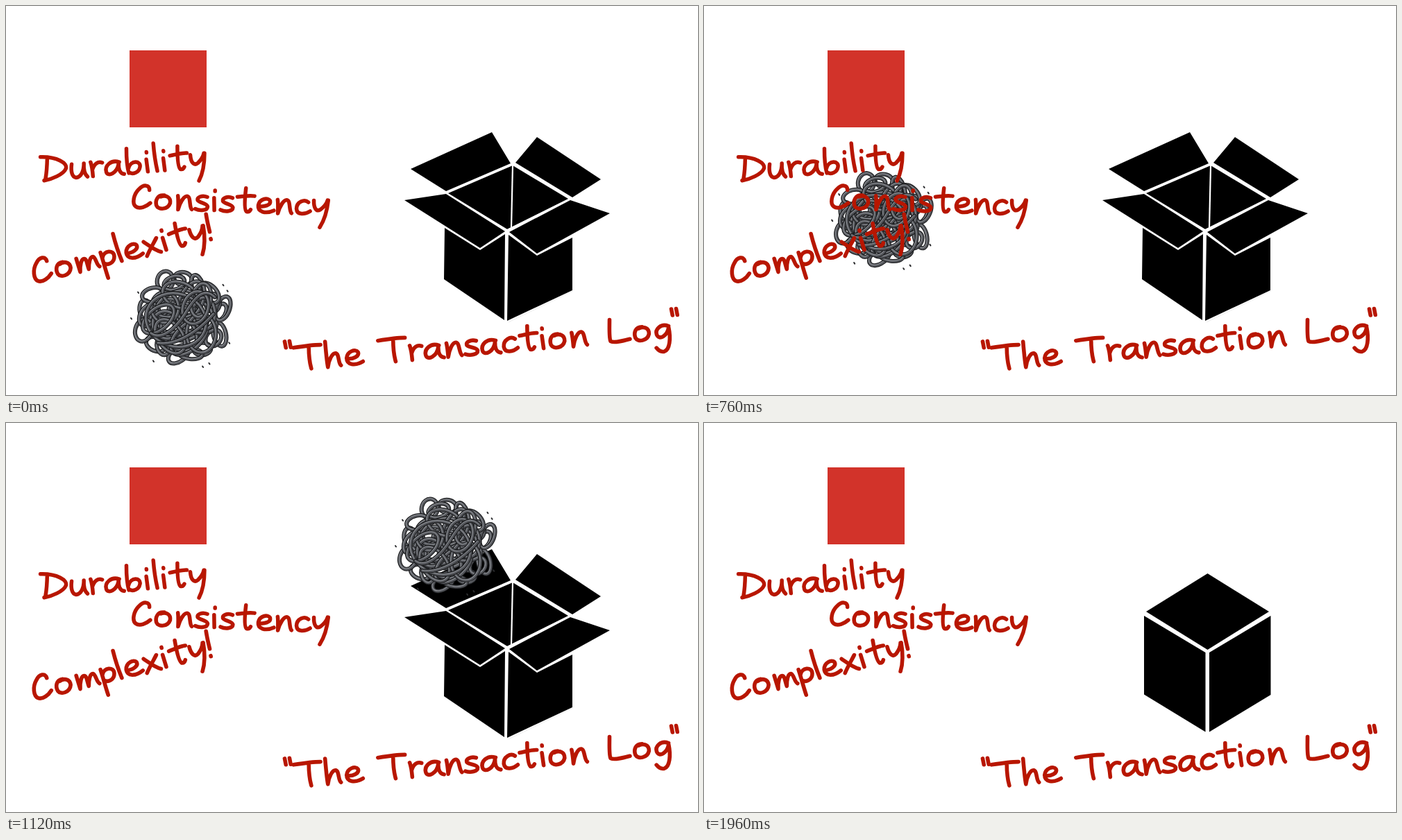
An HTML page that plays this animation: 997 px wide and 561 px high, repeating every 2480 ms.

```html
<!DOCTYPE html>
<html lang="en">
<head>
<meta charset="utf-8">
<title>The Transaction Log</title>
<style>
  html, body { margin: 0; width: 100%; height: 100%; overflow: hidden; background: #fff; }
  svg { display: block; width: 100vw; height: 100vh; }
  .line { fill: none; stroke-linecap: round; stroke-linejoin: round; }
  #writing { stroke: #b81600; stroke-width: 5.6; }
  #writing text { font: 44px "Open Sans", sans-serif; fill: transparent; stroke: none; }
</style>
</head>
<body>
<svg viewBox="0 0 997 561">
  <defs id="alphabet">
    <path data-ch="D" data-w="42" d="M10-33C9-22 8-12 5-1M0-34C24-33 40-22 36-14C32-6 14 0 3 1"/>
    <path data-ch="C" data-w="33" d="M25-27C25-35 16-35 10-28C2-20 0-6 6-2C12 2 22-3 27-8"/>
    <path data-ch="T" data-w="43" d="M1-32C14-33 28-34 40-33M23-32C22-20 22-10 24 0"/>
    <path data-ch="L" data-w="42" d="M10-34C9-22 7-8 9-3C14 0 26-2 37-4"/>
    <path data-ch="a" data-w="30" d="M22-18C10-23 0-14 2-5C4 3 18-2 21-16C20-8 22-1 28 0"/>
    <path data-ch="b" data-w="28" d="M4-37C3-24 3-10 5-1M5-8C9-20 24-18 22-9C20 0 10 2 5-2"/>
    <path data-ch="c" data-w="26" d="M20-18C14-23 3-18 3-8C4 2 16 0 23-5"/>
    <path data-ch="e" data-w="28" d="M3-10C12-8 22-12 20-18C17-23 5-21 3-11C2-1 14 2 26-4"/>
    <path data-ch="g" data-w="24" d="M21-18C10-23 1-15 3-7C6 2 18-4 21-16C23 0 20 16 12 18C6 19 3 15 1 12"/>
    <path data-ch="h" data-w="30" d="M4-37C4-22 4-10 5 0C7-10 13-20 18-19C23-17 20-5 24-1"/>
    <path data-ch="i" data-w="13" d="M4-19L5-1M5-30l0 1"/>
    <path data-ch="l" data-w="12" d="M3-42C3-28 4-14 6-1"/>
    <path data-ch="m" data-w="35" d="M3-20L4 0C6-10 10-18 14-17C18-16 16-6 17-1C19-10 23-18 27-17C31-15 29-4 33-1"/>
    <path data-ch="n" data-w="28" d="M3-20C4-14 4-8 4 0C6-10 12-21 17-20C22-19 20-4 24-1"/>
    <path data-ch="o" data-w="31" d="M14-20C4-21 1-12 3-5C6 2 20 1 23-9C24-18 16-21 9-18"/>
    <path data-ch="p" data-w="25" d="M4-20C5-6 5 6 6 18M5-12C9-22 24-20 22-10C20-1 10 1 5-4"/>
    <path data-ch="r" data-w="23" d="M3-21C5-14 5-8 5 0M5-10C8-18 14-22 20-19"/>
    <path data-ch="s" data-w="24" d="M18-20C10-23 3-19 4-15C6-11 18-11 19-6C19 0 8 1 1-2"/>
    <path data-ch="t" data-w="29" d="M13-35C12-22 11-4 15-1C18 0 20-2 21-4M1-22C10-23 18-25 26-24"/>
    <path data-ch="u" data-w="28" d="M3-20C1-10 2-1 8 0C15 0 20-8 21-19M21-20C20-12 21-4 25 0"/>
    <path data-ch="x" data-w="27" d="M3-20C10-12 16-4 24 0M22-21C16-14 8-6 3 1"/>
    <path data-ch="y" data-w="26" d="M2-21C2-10 6-4 12-8C18-13 21-18 22-22M23-22C22-8 18 8 12 18"/>
    <path data-ch="!" data-w="12" d="M5-37C4-26 4-18 4-11M3-1l0 1"/>
    <path data-ch='"' data-w="14" d="M3-42L4-33M10-42L11-33"/>
    <path data-ch=" " data-w="21" d=""/>
  </defs>

  <rect width="997" height="561" fill="#fff"/>

  <g id="openBack">
    <path d="M583 235L700 182L727 227L634 267ZM765 189L857 250L816 276L734 226Z"/>
    <path d="M637 270L730 230L810 278L722 322Z"/>
    <path d="M730 230L728 321" stroke="#fff" stroke-width="2.2"/>
  </g>

  <g id="tangle" class="line"></g>

  <g id="openFront">
    <path fill="#fff" d="M574 280L634 269L722 322L813 277L870 299L816 334V411L721 456L631 394V320Z"/>
    <path d="M574 280L634 271L719 325L683 349ZM725 326L813 280L870 299L765 357Z"/>
    <path d="M632 320L683 352L719 329L718 453L631 394ZM724 330L765 360L816 334V410L722 454Z"/>
    <path d="M724 456L817 411" stroke="#eee"/>
  </g>

  <g id="closedBox">
    <path d="M725.5 217L814 272L725.5 327L637 272Z"/>
    <path d="M634 278L722.5 331V445.5L634 391.5ZM816.5 278L728 331V445.5L816.5 392Z"/>
  </g>

  <rect x="166" y="62" width="135" height="115" fill="#fff"/>
  <rect x="178" y="64" width="111" height="111" fill="#d2332a"/>

  <g id="writing" class="line">
    <g transform="translate(52 251) rotate(-4.2) scale(.98)"><text>Durability</text></g>
    <g transform="translate(181 291) rotate(2.2) scale(.985)"><text>Consistency</text></g>
    <g transform="translate(41 400) rotate(-14)"><text>Complexity!</text></g>
    <g transform="translate(402 526) rotate(-4.8)"><text>"The Transaction Log"</text></g>
  </g>
</svg>

<script>
const LOOP = 2480, STEP = 40, MOVE_START = 480, MOVE_STEPS = 24, CLOSE = 1960;
const byId = id => document.getElementById(id);

// Handwriting: each line of text is set in the stroke alphabet.
const glyphs = new Map([...byId("alphabet").children].map(p => [p.dataset.ch, p]));
for (const text of document.querySelectorAll("#writing text")) {
  let x = 0;
  for (const ch of text.textContent) {
    const glyph = glyphs.get(ch).cloneNode();
    glyph.setAttribute("transform", `translate(${x} 0)`);
    text.parentNode.append(glyph);
    x += +glyph.dataset.w;
  }
}

// Tangle of cord, centred on its own origin.
let seed = 11;
const random = () => (seed = seed * 16807 % 2147483647) / 2147483647;
const between = (a, b) => a + (b - a) * random();

function stroke(d, color, width, transform = "") {
  const path = document.createElementNS("http://www.w3.org/2000/svg", "path");
  path.setAttribute("d", d);
  path.setAttribute("stroke", color);
  path.setAttribute("stroke-width", width);
  path.setAttribute("transform", transform);
  byId("tangle").append(path);
}

function cord(d, transform) {
  stroke(d, "#1b1c1e", 6, transform);
  stroke(d, "#54565b", 3.8, transform);
  stroke(d, "#8e9196", 1, `translate(-.7 -.7) ${transform}`);
}

function loop(x, y, rx, ry, angle) {
  cord(`M${-rx} 0A${rx} ${ry} 0 1 1 ${rx} 0A${rx} ${ry} 0 1 1 ${-rx} 0`,
       `translate(${x} ${y}) rotate(${angle})`);
}

const RIM = 19, CORE = 19, GOLDEN = 2.4;
for (let i = 0; i < RIM; i++) {
  const a = i * GOLDEN + between(-0.15, 0.15), r = between(48, 60);
  loop(r * Math.cos(a), r * Math.sin(a), between(12, 18), between(8, 12), a * 180 / Math.PI + 90 + between(-55, 55));
}
for (let i = 0; i < CORE; i++) {
  const a = i * GOLDEN, r = 37 * Math.sqrt((i + 0.5) / CORE);
  loop(r * Math.cos(a), r * Math.sin(a), between(20, 32), between(13, 23), between(0, 180));
}
loop(-10, 3, 44, 38, 20);
loop(18, -15, 24, 18, 110);
cord("M-46 22C-30 34-8 12 4-8S30-46 46-30", "");
cord("M-36 36C-12 40 20 22 44-6", "");

const specks = [-150, -40, -32, 28, 60, 68, 125, 180].map(deg => {
  const a = deg * Math.PI / 180;
  return `M${75 * Math.cos(a)} ${75 * Math.sin(a)}l1 1.5`;
});
stroke(specks.join(""), "#2b2c2e", 2);

// Throw path: a smooth curve through [step, x, y].
const easeInOut = u => u < 0.5 ? 2 * u * u : 1 - 2 * (1 - u) ** 2;
const knots = [[0, 0, 0], [5, -8.5, -73], [9, 44.5, -221], [14, 290, -313], [16, 381, -273], [24, 469, -115]]
  .map(([n, x, y]) => ({ s: easeInOut(n / MOVE_STEPS), x, y }));

function throwAt(s) {
  let x = 255, y = 450;
  for (const k of knots) {
    const weight = knots.reduce((w, o) => o === k ? w : w * (s - o.s) / (k.s - o.s), 1);
    x += weight * k.x;
    y += weight * k.y;
  }
  return [x, y];
}

const show = (id, on) => byId(id).style.display = on ? "" : "none";

function draw(t) {
  const open = t < CLOSE;
  for (const id of ["openBack", "tangle", "openFront"]) show(id, open);
  show("closedBox", !open);
  const n = Math.max(0, Math.min(MOVE_STEPS, Math.floor((t - MOVE_START) / STEP)));
  const [x, y] = throwAt(easeInOut(n / MOVE_STEPS));
  byId("tangle").setAttribute("transform", `translate(${x.toFixed(2)} ${y.toFixed(2)})`);
}

const start = performance.now();
function tick() {
  draw((performance.now() - start) % LOOP);
  requestAnimationFrame(tick);
}
tick();
</script>
</body>
</html>
```
